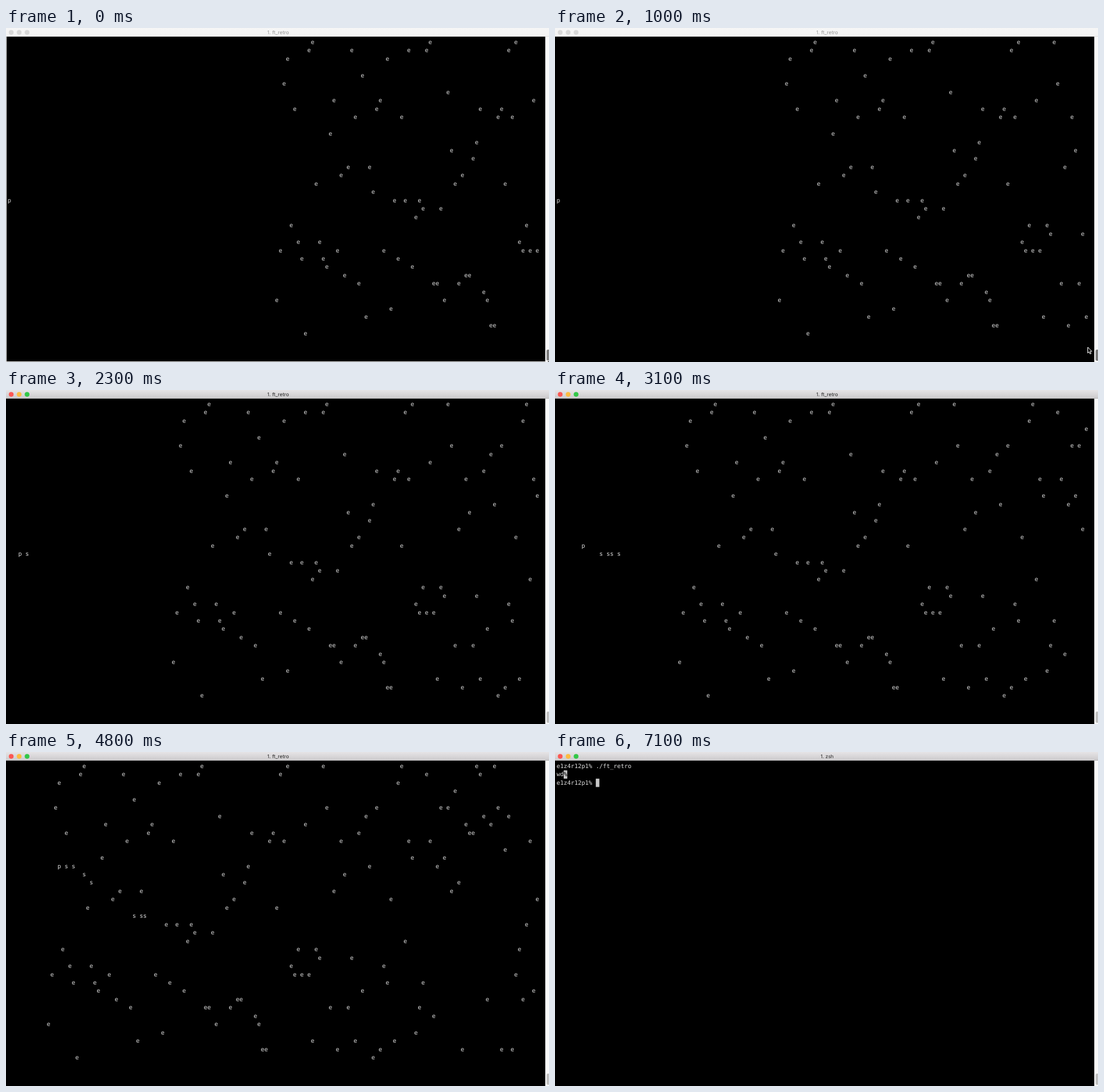
Animation of 876 by 540 pixels, one loop 7200 ms. Source, as an HTML page with a canvas:

```html
<!DOCTYPE html>
<html lang="en">
<head>
<meta charset="utf-8">
<title>ft_retro</title>
<style>
  html, body { margin: 0; width: 100%; height: 100%; overflow: hidden; background: #000; }
  canvas { display: block; width: 876px; height: 540px; }
</style>
</head>
<body>
<canvas id="stage" width="876" height="540"></canvas>
<script>
const ctx = document.getElementById('stage').getContext('2d');
const W = 876, H = 540, LOOP = 7200, STEP = 100;
const CELL = 5.755, LINE = 13.46, LEFT = 2.5, TOP = 16.4;
const FIRST_COL = 75, LAST_COL = 148, ROWS = 36;

// Steps at which something switches.
const UNHOVER = 11, FOCUS = 14, HIDE_POINTER = 17, GAME_END = 61, RETITLE = 64;

// Key points: [step or tick, values...], linear in between.
const pace = [[0, 0], [4, 6], [5, 6], [10, 13], [23, 29], [31, 41], [40, 52], [48, 64], [61, 82]];
const flight = [[18, 0, 19], [27, 3, 18], [33, 3, 18], [41, 7, 17], [52, 11, 14],
  [61, 14, 12], [64, 14, 12], [82, 17, 9]];
const pointer = [[0, 874, 537], [8, 859.5, 516], [10, 859.5, 516], [13, 224, 260]];
const typing = [[66, 6], [67, 5], [68, 5], [71, 0]];
const fireTicks = [28, 30, 31, 33, 53, 56, 61, 63];

function at(keys, t) {
  const i = keys.findIndex(k => k[0] > t);
  if (i === 0) return keys[0].slice(1);
  if (i < 0) return keys[keys.length - 1].slice(1);
  const a = keys[i - 1], b = keys[i];
  const f = (t - a[0]) / (b[0] - a[0]);
  return a.slice(1).map((v, j) => v + (b[j + 1] - v) * f + 1e-9);
}

function playerAt(tick) {
  const [col, row] = at(flight, tick);
  return { col: Math.floor(col), row: Math.round(row) };
}

// One enemy enters per tick, its row drawn by the minimal standard generator.
let seed = 1;
const enemies = Array.from({ length: 160 }, (_, i) => {
  seed = seed * 16807 % 2147483647;
  return { col: FIRST_COL + i, row: seed % ROWS, end: Infinity };
});

// A shot starts next to the player and ends with the first enemy it meets.
const shots = fireTicks.map(start => {
  const { col, row } = playerAt(start);
  const shot = { start, row, col: col + 1 - start, end: Infinity };
  const meet = e => (e.col - shot.col) / 2;
  const victim = enemies.find(e => e.row === row && e.end === Infinity &&
    meet(e) >= start && Number.isInteger(meet(e)));
  if (victim) shot.end = victim.end = meet(victim);
  return shot;
});

function rect(x, y, w, h, fill) {
  ctx.fillStyle = fill;
  ctx.fillRect(x, y, w, h);
}

function put(text, col, row, color = '#dcdcdc') {
  ctx.font = '9.57px "DejaVu Sans Mono", monospace';
  ctx.fillStyle = color;
  [...text].forEach((ch, i) =>
    ctx.fillText(ch, LEFT + (col + i + 0.5) * CELL, TOP + row * LINE + 9.6));
}

function block(col, row) {
  rect(LEFT + col * CELL, TOP + row * LINE - 0.2, CELL, LINE, '#c7c7c7');
}

function drawGame(n) {
  const tick = Math.floor(at(pace, n)[0]);
  for (const e of enemies) {
    const col = e.col - tick;
    if (tick < e.end && col >= 0 && col <= LAST_COL) put('e', col, e.row);
  }
  for (const s of shots) {
    if (tick >= s.start && tick < s.end) put('s', s.col + tick, s.row);
  }
  const { col, row } = playerAt(tick);
  put('p', col, row);
}

function drawShell(n) {
  const prompt = 'e1z4r12p1% ';
  const typed = 'wdwdwd'.slice(0, Math.floor(at(typing, n)[0]));
  put(prompt + './ft_retro', 0, 0);
  put('wd', 0, 1);
  block(2, 1);
  put('%', 2, 1, '#000');
  put(prompt + typed, 0, 2);
  block(prompt.length + typed.length, 2);
}

function drawWindow(n) {
  const active = n >= FOCUS;
  const bar = ctx.createLinearGradient(0, 0, 0, 14);
  bar.addColorStop(0, active ? '#e6e4e6' : '#f6f6f6');
  bar.addColorStop(1, active ? '#cbc9cb' : '#f4f4f4');
  rect(0, 0, W, 14, bar);
  rect(0, 13.4, W, 0.6, active ? '#aaa' : '#d8d8d8');
  ['#fc5753', '#fdbc40', '#33c748'].forEach((color, i) => {
    ctx.fillStyle = active ? color : '#d8d8d8';
    ctx.beginPath();
    ctx.arc(8.4 + i * 12.8, 7.1, 3.85, 0, Math.PI * 2);
    ctx.fill();
  });
  ctx.font = '8px Inter, sans-serif';
  ctx.fillStyle = active ? '#262626' : '#989898';
  ctx.fillText(n < RETITLE ? '1. ft_retro' : '1. zsh', 439, 10.2);

  rect(870, 14, 6, H - 14, '#fafafa');
  ctx.fillStyle = n < UNHOVER ? '#7d7d7d' : '#c1c1c1';
  ctx.beginPath();
  ctx.roundRect(872, 520, 6, 18, 2);
  ctx.fill();
  if (n < 1) {
    rect(0, 14, 1, H - 14, '#e0e0e0');
    rect(0, H - 1, 870, 1, '#e0e0e0');
  }
}

function drawPointer(n) {
  if (n >= HIDE_POINTER) return;
  const [x, y] = at(pointer, n);
  ctx.save();
  ctx.translate(x, y);
  const arrow = new Path2D('M0 0V9.5L2.2 7.5 3.7 11 5.3 10.3 3.8 7 6.6 6.8Z');
  ctx.fillStyle = '#000';
  ctx.strokeStyle = '#fff';
  ctx.fill(arrow);
  ctx.stroke(arrow);
  ctx.restore();
}

ctx.textAlign = 'center';
ctx.textRendering = 'geometricPrecision';
const start = performance.now();
function frame(now) {
  const n = Math.floor(Math.max(0, now - start) % LOOP / STEP);
  rect(0, 0, W, H, '#000');
  if (n < GAME_END) drawGame(n);
  else drawShell(n);
  drawWindow(n);
  drawPointer(n);
  requestAnimationFrame(frame);
}
frame(start);
</script>
</body>
</html>
```
